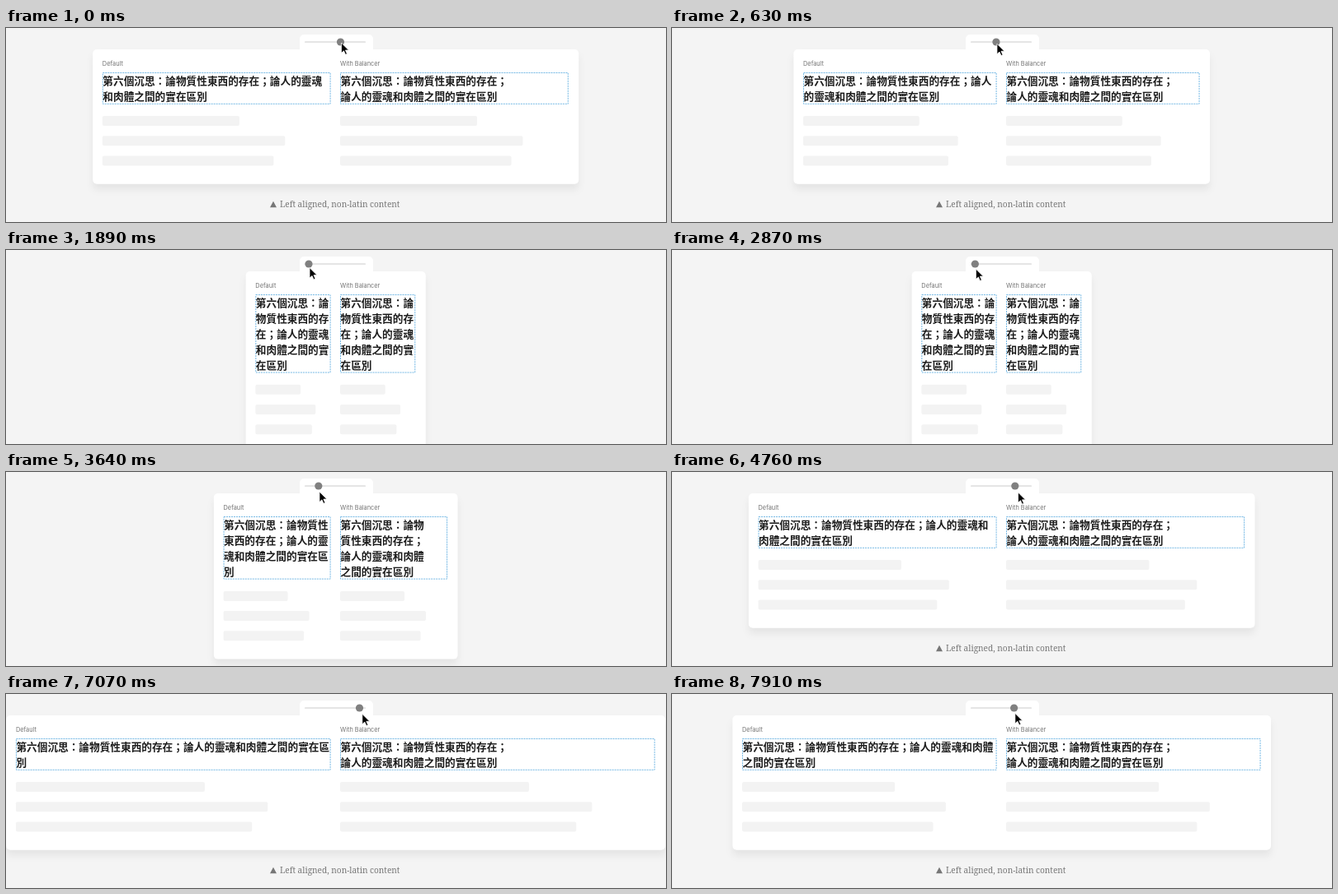
An HTML page that plays this animation: 800 px wide and 236 px high, repeating every 7.98 s.

```html
<!DOCTYPE html>
<html lang="zh-Hant">
<head>
<meta charset="utf-8">
<style>
  html, body { margin: 0; width: 100%; height: 100%; overflow: hidden; background: #f4f4f4; }
  svg { display: block; }
  .label { font: 7.35px Inter, sans-serif; fill: #737373; }
  .title { font: 700 12.67px "Noto Sans CJK TC", "Noto Sans CJK", sans-serif; fill: #1c1c1c; }
  .caption { font: 10.1px "Noto Serif", serif; fill: #777; }
  .frame { fill: none; stroke: #74b8e4; stroke-dasharray: 2 1; }
  .card { fill: #fff; filter: drop-shadow(0 7px 4px rgba(0, 0, 0, .06)); }
</style>
</head>
<body>
<svg id="stage" width="800" height="236"></svg>
<script>
const LOOP = 7980, STEP = 70, EM = 12.67, LEADING = 18.9;
const NARROW = 109, WIDE = 403.4;        // half the card's width
const KNOB_MIN = 367, KNOB_MAX = 431.5;
const LEAD = 160;                        // the card trails the knob by this many ms
const TITLE = '第六個沉思：論物質性東西的存在；論人的靈魂和肉體之間的實在區別';
const stage = document.getElementById('stage');

// Half the card's width at the turns of the drag: [time, value].
const drag = [[0, 294.5], [630, 252.3], [840, 220], [1890, NARROW], [2900, NARROW],
  [3640, 147.8], [4760, 306.8], [5500, WIDE], [6900, WIDE], [7910, 326.3]];

// Monotone cubic interpolation: smooth, never overshooting.
function sample(track, t) {
  const last = track.length - 1;
  if (t >= track[last][0]) return track[last][1];
  const slope = i => (track[i + 1][1] - track[i][1]) / (track[i + 1][0] - track[i][0]);
  const tangent = i => {
    if (i === 0) return slope(0);
    if (i === last) return slope(last - 1);
    const a = slope(i - 1), b = slope(i);
    return a * b > 0 ? 2 * a * b / (a + b) : 0;
  };
  const i = track.findIndex(p => p[0] > t) - 1;
  const [t0, v0] = track[i], [t1, v1] = track[i + 1];
  const d = t1 - t0, u = (t - t0) / d, w = 1 - u;
  return v0 * (1 + 2 * u) * w * w + v1 * (3 - 2 * u) * u * u
    + d * u * w * (tangent(i) * w - tangent(i + 1) * u);
}

// Breaks the title after at most `fit` characters; no line starts with punctuation.
function wrap(fit) {
  const lines = [];
  for (let from = 0; from < TITLE.length;) {
    let to = from + fit;
    if ('：；'.includes(TITLE[to])) to--;
    lines.push(TITLE.slice(from, to));
    from = to;
  }
  return lines;
}

// The narrowest wrapping that keeps the number of lines.
function balance(count) {
  let fit = Math.ceil(TITLE.length / count);
  while (wrap(fit).length > count) fit++;
  return wrap(fit);
}

const rect = (x, y, w, h, attrs) =>
  `<rect x="${x}" y="${y}" width="${w}" height="${h}" ${attrs}/>`;
const text = (x, y, kind, s) => `<text x="${x}" y="${y}" class="${kind}">${s}</text>`;

function column(x, width, label, lines) {
  const boxHeight = lines.length * LEADING + 1;
  const bars = [.6, .8, .75].map((part, i) =>
    rect(x, 68.3 + boxHeight + i * 24.2, width * part, 12, 'rx="2" fill="#f3f3f3"'));
  return text(x, 46, 'label', label)
    + rect(x + .5, 54.5, width - 1, boxHeight - 1, 'class="frame"')
    + lines.map((s, i) => text(x + .5, 69 + i * LEADING, 'title', s)).join('')
    + bars.join('');
}

function draw(t) {
  const half = sample(drag, t), width = half - 17.75;
  const plain = wrap(Math.floor(width / EM));
  const bottom = 152 + plain.length * LEADING, baseline = bottom + 28.5;
  const pull = (sample(drag, t + LEAD) - NARROW) / (WIDE - NARROW);
  const knob = KNOB_MIN + pull * (KNOB_MAX - KNOB_MIN);
  // The pointer runs past the knob at the wide end and sinks slowly below it.
  const pointerX = knob + 1 + 7.5 * Math.exp(-(((t - 5880) / 1100) ** 2));
  const pointerY = 18 + 7 * Math.sin(t / 3500);
  stage.innerHTML =
    rect(399.7 - half, 26, half * 2, bottom - 26, 'rx="5" class="card"')
    + rect(356, 8, 89, 24, 'rx="5" fill="#fff"')
    + rect(362, 16.4, 74, 1.2, 'rx=".6" fill="#ccc"')
    + `<circle cx="${knob}" cy="17" r="4.6" fill="#808080"/>`
    + column(393.6 - width, width, 'Default', plain)
    + column(405, width, 'With Balancer', balance(plain.length))
    + `<path d="M320 ${baseline}h8l-4-7.5z" fill="#777"/>`
    + text(332, baseline, 'caption', 'Left aligned, non-latin content')
    + `<path transform="translate(${pointerX} ${pointerY})"
        d="M0 0V12.5L3 9.8L5 14.3L7 13.4L5 9H9Z" stroke="#fff" stroke-width=".8"/>`;
}

const start = performance.now();
function tick() {
  const t = (performance.now() - start) % LOOP;
  draw(Math.floor(t / STEP) * STEP);
  requestAnimationFrame(tick);
}
tick();
</script>
</body>
</html>
```
